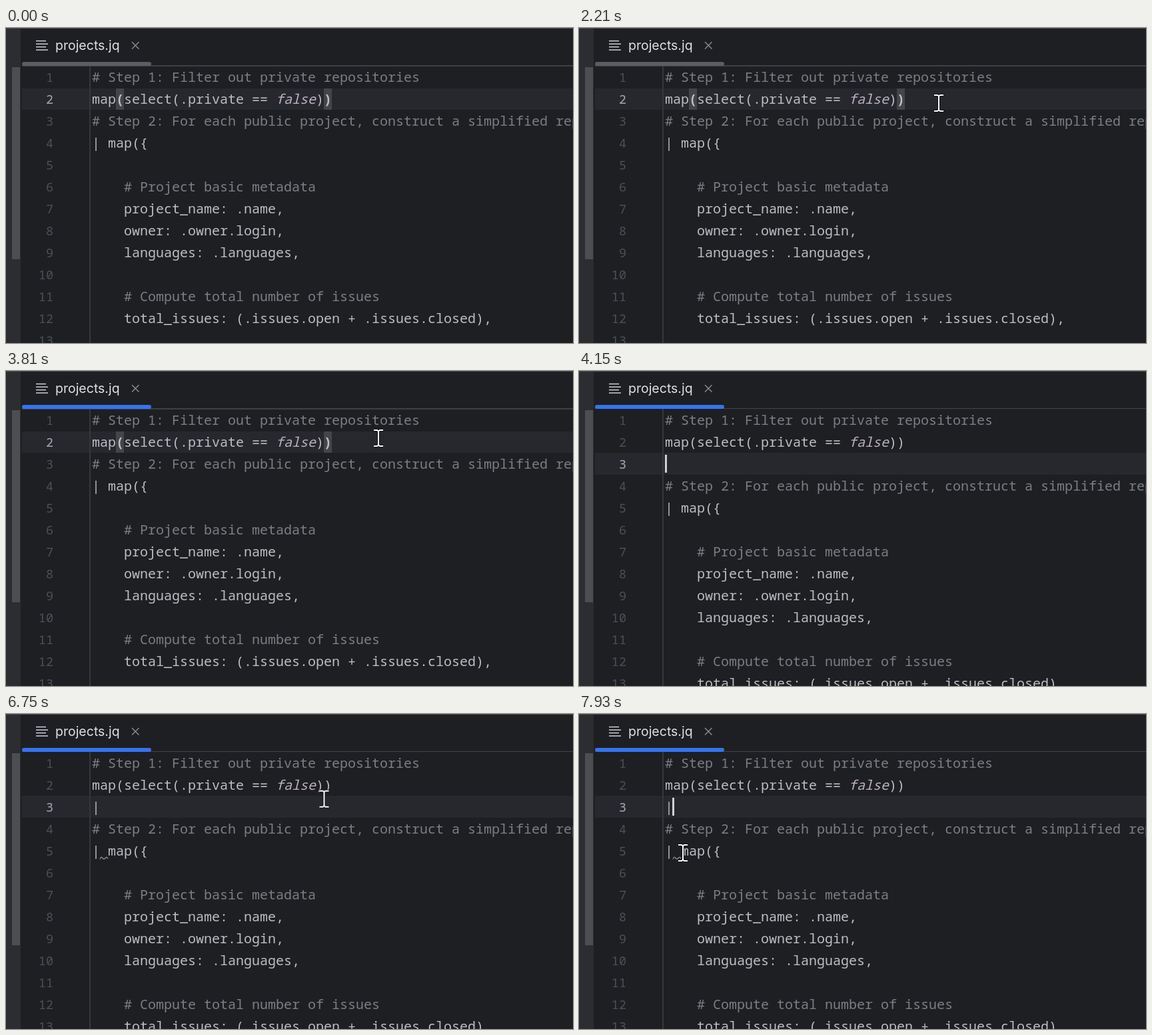
Animation of 851 by 474 pixels, one loop 8 s. Source, as an HTML page:

```html
<!DOCTYPE html>
<html lang="en">
<head>
<meta charset="utf-8">
<title>Editor</title>
<style>
html, body { margin: 0; width: 100%; height: 100%; overflow: hidden; background: #1e1f22; }
svg { display: block; }
text { white-space: pre; }
.code { font: 20px "Noto Sans Mono", "DejaVu Sans Mono", monospace; fill: #bcbec4; }
.comment { fill: #7a7e85; }
.bool { font-style: italic; fill: #bdb1c1; }
.bold { font-weight: 700; }
.num { font-size: 18.5px; fill: #4b5059; text-anchor: end; }
.num.current { fill: #a1a3ab; }
.tab { font: 19.5px Inter, "Open Sans", sans-serif; fill: #dfe1e5; }

.early, .late, .unfocused, .focused, .pipe, .wave, .caret, .tail { animation: 8s step-end infinite; }
.early { animation-name: early; }
.late { animation-name: late; }
.unfocused { animation-name: unfocused; }
.focused { animation-name: focused; }
.pipe { animation-name: pipe; }
.wave { animation-name: wave; }
.tail { animation-name: tail; }
.caret { animation-name: caret; }
.pointer { animation: move 8s linear infinite, show 8s step-end infinite; }

@keyframes early { 0% { opacity: 1 } 51.875%, 100% { opacity: 0 } }
@keyframes late { 0% { opacity: 0 } 51.875%, 100% { opacity: 1 } }
@keyframes unfocused { 0% { opacity: 1 } 35.125%, 100% { opacity: 0 } }
@keyframes focused { 0% { opacity: 0 } 35.125%, 100% { opacity: 1 } }
@keyframes pipe { 0% { opacity: 0 } 71.875%, 100% { opacity: 1 } }
@keyframes wave { 0% { opacity: 0 } 79.375%, 100% { opacity: 1 } }
@keyframes tail { 0% { transform: none } 51.875%, 100% { transform: translateY(33px) } }
@keyframes caret {
  0% { opacity: 0; transform: translate(488px, 93px) }
  35.125% { opacity: 1; transform: translate(488px, 93px) }
  47.625% { opacity: 0; transform: translate(488px, 93px) }
  51.875% { opacity: 1; transform: translate(129px, 126px) }
  60.25% { opacity: 0; transform: translate(129px, 126px) }
  66.125% { opacity: 1; transform: translate(129px, 126px) }
  71.875% { opacity: 1; transform: translate(140px, 126px) }
  78.5% { opacity: 0; transform: translate(140px, 126px) }
  85% { opacity: 1; transform: translate(140px, 126px) }
  91.25% { opacity: 0; transform: translate(140px, 126px) }
  97.5%, 100% { opacity: 1; transform: translate(140px, 126px) }
}
@keyframes show {
  0% { opacity: 0 }
  2.75% { opacity: 1 }
  51.875% { opacity: 0 }
  82.75%, 100% { opacity: 1 }
}
@keyframes move {
  0%, 2.75% { transform: translate(301px, 165px) }
  3.75% { transform: translate(246px, 112px) }
  4.75% { transform: translate(252px, 102px) }
  7.375% { transform: translate(252px, 102px); animation-timing-function: ease-in-out }
  17.625% { transform: translate(546px, 119px) }
  19.25% { transform: translate(553px, 116px) }
  21%, 26.75% { transform: translate(541px, 113px) }
  27.625% { transform: translate(540px, 113px); animation-timing-function: ease-in-out }
  31.75% { transform: translate(560px, 101px) }
  35.125% { transform: translate(560px, 101px) }
  36%, 82% { transform: translate(559px, 101px); animation-timing-function: cubic-bezier(.35, .2, .65, .9) }
  90.375% { transform: translate(248px, 203px) }
  92.125% { transform: translate(208px, 208px); animation-timing-function: ease-out }
  99.125%, 100% { transform: translate(156px, 209px) }
}
</style>
</head>
<body>
<svg width="851" height="474" viewBox="0 0 851 474">
  <rect width="851" height="474" fill="#1e1f22"/>
  <rect width="22" height="474" fill="#2b2d30"/>
  <rect x="9" y="59" width="12" height="289" fill="#4d4e51"/>
  <rect width="851" height="1" fill="#4b4d51"/>

  <!-- current row and matched brackets -->
  <g class="early">
    <rect x="24" y="91" width="827" height="32" fill="#26282e"/>
    <path d="M165 91h12v32h-12zM477 91h12v32h-12z" fill="#43454a"/>
  </g>
  <rect class="late" x="24" y="123" width="827" height="33" fill="#26282e"/>
  <rect x="125" y="57" width="2" height="417" fill="#35373b"/>

  <!-- tab -->
  <rect x="24" y="56" width="827" height="1" fill="#43454a"/>
  <rect class="early" x="24" y="57" width="827" height="1" fill="#393b40"/>
  <rect class="unfocused" x="24" y="51" width="194" height="6" rx="3" fill="#5a5d63"/>
  <rect class="focused" x="24" y="51" width="194" height="6" rx="3" fill="#3574f0"/>
  <path d="M45 19.5h15M45 24h18M45 28.5h15M45 33h18" stroke="#ced0d6" stroke-width="1.6"/>
  <text class="tab" x="74" y="33">projects.jq</text>
  <path d="M189 21l10.5 10.5M199.5 21l-10.5 10.5" stroke="#868a91" stroke-width="1.5"/>

  <g class="code">
    <g id="numbers"></g>
    <g id="head"></g>
    <g id="tail" class="tail"></g>
    <g class="early bold">
      <text x="165" y="114">(</text>
      <text x="477" y="114">)</text>
    </g>
    <text class="pipe" x="129" y="147">|</text>
  </g>

  <path class="wave" d="M141 218.5q1.5 -4.5 3 -2.5t3 2t3 -2t3 2" fill="none" stroke="#8a8a8a" stroke-width="1.3"/>
  <rect class="caret" width="3" height="27" fill="#ced0d6"/>
  <g class="pointer" fill="none">
    <path d="M-7 -12h5l2 1.5l2 -1.5h5M-7 12h5l2 -1.5l2 1.5h5M0 -11v22" stroke="#111214" stroke-width="4"/>
    <path d="M-7 -12h5l2 1.5l2 -1.5h5M-7 12h5l2 -1.5l2 1.5h5M0 -11v22" stroke="#fff" stroke-width="2"/>
  </g>
</svg>
<script>
const ROW = 33, BASE = 81, LEFT = 129, CELL = 12;
const lines = [
  "# Step 1: Filter out private repositories",
  "map(select(.private == false))",
  "# Step 2: For each public project, construct a simplified representation",
  "| map({",
  "",
  "    # Project basic metadata",
  "    project_name: .name,",
  "    owner: .owner.login,",
  "    languages: .languages,",
  "",
  "    # Compute total number of issues",
  "    total_issues: (.issues.open + .issues.closed),"
];

function addText(parent, content, x, row, className = "") {
  const node = document.createElementNS("http://www.w3.org/2000/svg", "text");
  node.setAttribute("x", x);
  node.setAttribute("y", BASE + ROW * row);
  node.setAttribute("class", className);
  node.textContent = content;
  document.getElementById(parent).append(node);
}

lines.forEach((line, row) => {
  const parent = row < 2 ? "head" : "tail";
  const put = (content, col, className) =>
    addText(parent, content, LEFT + CELL * col, row, className);
  const indent = line.length - line.trimStart().length;
  const bool = line.indexOf("false");
  if (bool < 0) {
    put(line.trim(), indent, line.trim()[0] === "#" ? "comment" : "");
  } else {
    put(line.slice(0, bool), 0);
    put("false", bool, "bool");
    put(line.slice(bool + 5), bool + 5);
  }
});

for (let n = 1; n <= 13; n++) addText("numbers", n, 71, n - 1, "num");

// The active line number brightens over the dim one.
addText("numbers", 2, 71, 1, "num current early");
addText("numbers", 3, 71, 2, "num current late");
</script>
</body>
</html>
```
